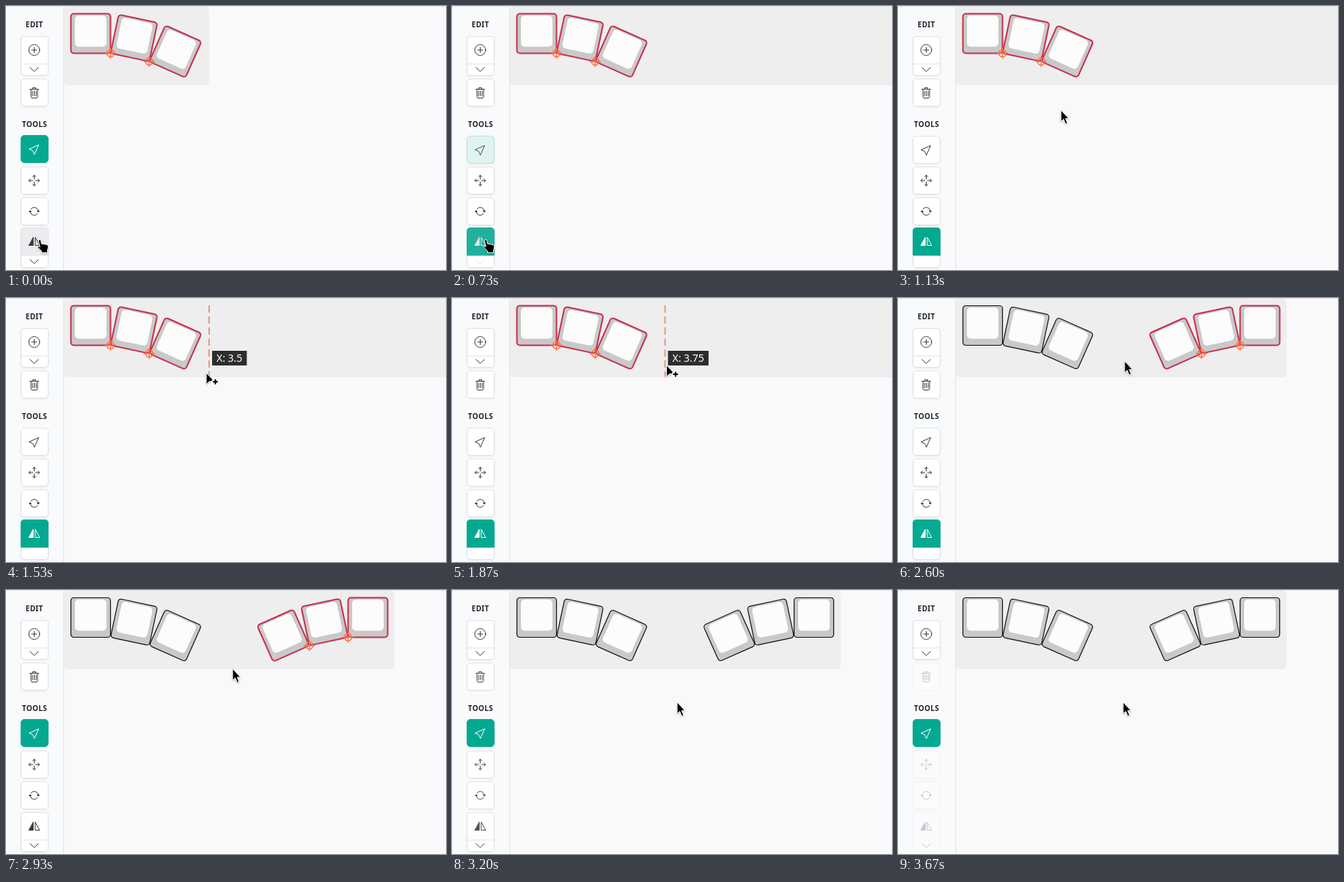
An HTML page that plays this animation: 600x360 px, repeating every 3.87 s.

```html
<!DOCTYPE html>
<html lang="en">
<head>
<meta charset="utf-8">
<title>Mirror tool</title>
<style>
  html, body { margin: 0; height: 100%; overflow: hidden; background: #f9f9fc; }
  svg { display: block; width: 100vw; height: 100vh; }
  text { font: 14px "Noto Sans", sans-serif; }
  .head { font-size: 10px; font-weight: 600; letter-spacing: .3px; text-anchor: middle; fill: #212529; }
  .button { --on: 0%; --base: #fff; filter: drop-shadow(0 1px 1px #00000012); }
  .box { fill: #fff; stroke: #dee2e6; }
  .face { fill: color-mix(in srgb, #02a990 var(--on), var(--base));
          stroke: color-mix(in srgb, #02a990 var(--on), #dee2e6); }
  .icon { --ink: color-mix(in srgb, #fff var(--on), #343a40); fill: none; stroke: var(--ink);
          stroke-linecap: round; stroke-linejoin: round; }
  .solid { fill: var(--ink); }
  .pivot { fill: none; stroke: #ff6b3d; stroke-width: 1.3; }
  .cursor { stroke: #fff; stroke-width: 1; stroke-linejoin: round; filter: drop-shadow(0 1px 1px #0004); }
</style>
</head>
<body>
<svg id="stage" viewBox="0 0 600 360"></svg>
<script>
const LOOP = 3870, UNIT = 54, LEFT = 88;
const PRESS = 600, MIRROR = 2600, DESELECT = 3200;

// Pointer path: time, x, y
const path = [
  [800, 46, 319], [930, 130, 240], [1070, 208, 157], [1130, 222, 142],
  [1330, 252, 116], [1530, 273, 102], [1670, 284, 97], [1930, 295, 90],
  [2040, 296, 90], [2270, 309, 86], [2730, 309, 86], [2930, 309, 107], [3070, 307, 153]
];

const icons = {
  add: '<circle cx="8" cy="8" r="7.4"/><path d="M8 4.5v7M4.5 8h7"/>',
  trash: '<path d="M3.5 4v9.5a2 2 0 0 0 2 2h5a2 2 0 0 0 2-2V4M2 3.5h12M6 3V1.5h4V3M5.5 6v6.5M8 6v6.5M10.5 6v6.5"/>',
  select: '<path d="M13.7 2.5 1 8.2 6 10.3 8 15.2Z"/>',
  move: '<path d="M8 .8V6M8 10v5.2M.8 8H6M10 8h5.2M5.9 2.9 8 .8l2.1 2.1M5.9 13.1 8 15.2l2.1-2.1M2.9 5.9.8 8l2.1 2.1M13.1 5.9 15.2 8l-2.1 2.1"/>',
  rotate: '<path d="M3.5 4.9A5.5 5.5 0 0 1 13.4 7M12.5 11.1A5.5 5.5 0 0 1 2.6 9"/>' +
    '<path class="solid" stroke="none" d="M11.3 7h4.4l-2.2 2.8ZM.3 9h4.4L2.5 6.2Z"/>',
  mirror: '<path class="solid" d="M6.6 2.8V13.5H1Z"/><path d="M9.4 2.8V13.5H15Z"/>'
};

const chevron = y => `<path class="icon" d="M32.8 ${y - 2.7}l5.7 5.5 5.7-5.5"/>`;

function button(name, y, split) {
  const face = split
    ? `<rect class="box" x="20.5" y="${y}" width="37" height="53" rx="4.5"/>
       <path class="face raise" d="M20.5 ${y + 37.5}V${y + 4.5}q0-4.5 4.5-4.5h28q4.5 0 4.5 4.5v33z"/>${chevron(y + 45)}`
    : `<rect class="face raise" x="20.5" y="${y}" width="37" height="37" rx="4.5"/>`;
  return `<g class="button" id="${name}">${face}
    <g class="raise"><g class="icon" transform="translate(30.5 ${y + 10.5})">${icons[name]}</g></g></g>`;
}

const key = `<rect width="54" height="54" rx="4" fill="#c9c9c9" stroke="currentColor"/>
  <rect x="5.5" y="2.5" width="43" height="42.5" rx="5" fill="#fcfcfc"/>`;
const pivot = '<path class="pivot" d="M-7.5 0h15M0-7.5v15M5 0A5 5 0 1 1-5 0 5 5 0 1 1 5 0"/>';

// Each key hangs 12 degrees further around the previous bottom right corner
const fan = (id, transform) => `<g id="${id}" transform="${transform}">
  <g transform="translate(88.5 10.5)">${key}
    <g transform="translate(54 54) rotate(12)"><g transform="translate(0 -54)">${key}</g>
      <g transform="translate(54 0) rotate(12)"><g transform="translate(0 -54)">${key}</g>
        <g class="pivots" transform="rotate(-24)">${pivot}</g></g>
      <g class="pivots" transform="rotate(-12)">${pivot}</g></g></g></g>`;

const stage = document.getElementById('stage');
stage.innerHTML = `
  <rect width="600" height="360" fill="#f9f9fc"/>
  <rect id="panel" x="79" y="1" height="107" rx="5" fill="#eeeeee"/>
  ${fan('first', '')}${fan('second', 'translate(609) scale(-1 1)')}
  <g id="guide">
    <path id="axis" d="M0 10V107.5" stroke="#ec958c" stroke-width="2" stroke-dasharray="10 5"/>
    <g id="tip"><rect id="tipBox" y="72" height="20" fill="#2d2d2d"/><text id="tipText" x="6" y="87" fill="#fff"></text></g>
  </g>
  <rect width="78" height="360" fill="#f9fafb"/>
  <path d="M78.5 0V360M0 .5H600" stroke="#e1e4e8"/>
  <text class="head" x="38.7" y="29">EDIT</text>
  <text class="head" x="38.9" y="165">TOOLS</text>
  ${button('add', 41.5, true)}${button('trash', 99.5)}
  ${button('select', 177.5)}${button('move', 219.5)}${button('rotate', 261.5)}${button('mirror', 303.5, true)}
  <g id="pointer">
    <path id="hand" class="cursor" d="M-1.7 1.5Q-1.5-.6 0-.6 1.5-.6 1.7 1.2L2.3 5.2 9 6.2Q12 6.8 11.8 9.2L10.6 14V17.3H2.4V15L-2.2 10.6Q-3 8.8-1.4 8.5L.3 9.4Z"/>
    <path id="arrow" class="cursor" d="M0 0V15.8L3.6 12.5 6.2 18.9 8.9 17.8 6.3 11.6H10.8Z"/>
    <g id="copy"><path class="cursor" d="M0 0V15.8L4 12 10.8 11.4Z"/>
      <circle cx="12.4" cy="12.4" r="5.2" fill="#fff"/>
      <path d="M12.4 8.9v7M8.9 12.4h7" stroke="#000" stroke-width="2"/></g>
  </g>`;

const $ = id => document.getElementById(id);
const show = (el, on) => el.setAttribute('visibility', on ? 'visible' : 'hidden');
const ramp = (t, start, length) => Math.min(1, Math.max(0, (t - start) / length));

function pointerAt(t) {
  const next = path.findIndex(p => p[0] > t);
  if (next === 0) return path[0].slice(1);
  if (next < 0) return path.at(-1).slice(1);
  const [t0, x0, y0] = path[next - 1], [t1, x1, y1] = path[next];
  const k = (t - t0) / (t1 - t0);
  return [x0 + (x1 - x0) * k, y0 + (y1 - y0) * k];
}

function setButton(name, on, lift = on) {
  $(name).style.setProperty('--on', on * 100 + '%');
  for (const el of $(name).querySelectorAll('.raise')) el.setAttribute('transform', `translate(0 ${-lift})`);
}

function setFan(id, selected) {
  const fan = $(id);
  fan.setAttribute('color', selected ? '#c8304e' : '#111');
  fan.setAttribute('stroke-width', selected ? 2 : 1.2);
  for (const el of fan.querySelectorAll('.pivots')) show(el, selected);
}

function draw(t) {
  const [x, y] = pointerAt(t);
  const mirroring = t >= PRESS && t < MIRROR, done = t >= MIRROR;
  const mirrorOn = ramp(t, PRESS, 150) - ramp(t, MIRROR, 150);
  const hover = x < 58;

  $('panel').setAttribute('width', mirroring ? 540 : done ? 451 : 198);
  setFan('first', !done);
  setFan('second', done && t < DESELECT);
  $('second').style.display = done ? '' : 'none';

  setButton('select', 1 - mirrorOn);
  setButton('mirror', mirrorOn, hover ? 1 : mirrorOn);
  $('mirror').style.setProperty('--base', hover ? '#ebecee' : '#fff');
  for (const name of ['trash', 'move', 'rotate', 'mirror'])
    $(name).style.opacity = 1 - .75 * ramp(t, DESELECT - 30, 200);

  // The axis snaps to quarter units
  const aiming = mirroring && x > 79 && y < 108;
  $('guide').style.display = aiming ? '' : 'none';
  if (aiming) {
    const value = Math.round((x - LEFT) / UNIT * 4) / 4, axisX = LEFT + value * UNIT;
    $('axis').setAttribute('transform', `translate(${axisX})`);
    $('tip').setAttribute('transform', `translate(${axisX + 4})`);
    $('tipText').textContent = 'X: ' + value;
    $('tipBox').setAttribute('width', $('tipText').getComputedTextLength() + 12);
  }

  $('pointer').setAttribute('transform', `translate(${x} ${y})`);
  show($('hand'), hover);
  show($('arrow'), !hover && !aiming);
  show($('copy'), aiming);
}

const start = performance.now();
function tick() {
  draw((performance.now() - start) % LOOP);
  requestAnimationFrame(tick);
}
tick();
</script>
</body>
</html>
```
